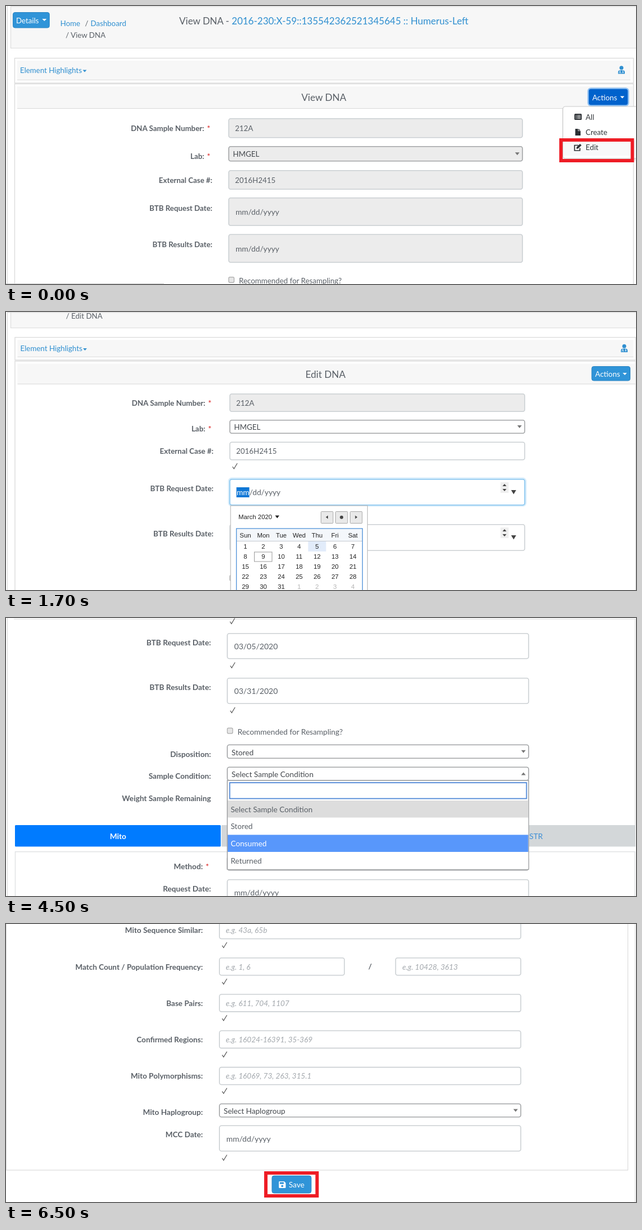
An HTML page that plays this animation: 1125x498 px, repeating every 8 s.

```html
<!DOCTYPE html>
<html lang="en">
<head>
<meta charset="utf-8">
<title>DNA form walkthrough</title>
<style>
html, body { margin: 0; width: 100%; height: 100%; overflow: hidden; background: #fff; }
svg { display: block; width: 1125px; height: 498px; font-family: Lato, "Open Sans", sans-serif; }
text { white-space: pre; }
.cal text { font-family: "Liberation Sans", Arial, sans-serif; }
</style>
</head>
<body>
<svg id="stage" viewBox="0 0 1125 498" xmlns="http://www.w3.org/2000/svg"></svg>
<script>
const INK = '#5a6067', DARK = '#45494e', LINK = '#2f8fd0', BLUE = '#3094d8',
      EDGE = '#cbd0d3', LINE = '#dcdcdc', PALE = '#f7f7f7', RED = '#ee1c25', LAB = 'HMGEL';
let size = 13.4;

// Boxes are given by their corners.
const box = (x1, y1, x2, y2, fill, stroke = 'none', w = 1.5, r = 0) =>
  `<rect x="${x1}" y="${y1}" width="${x2 - x1}" height="${y2 - y1}" rx="${r}" fill="${fill}" stroke="${stroke}" stroke-width="${w}"/>`;
const path = (d, fill, stroke = 'none', w = 1) =>
  `<path d="${d}" fill="${fill}" stroke="${stroke}" stroke-width="${w}"/>`;
const line = (x1, y1, x2, y2, c = LINE, w = 1.2) => path(`M${x1} ${y1}L${x2} ${y2}`, 'none', c, w);
const text = (s, x, y, fill = INK, o = {}) =>
  `<text x="${x}" y="${y}" fill="${fill}" font-size="${o.size || size}" font-weight="${o.bold ? 700 : 400}"` +
  ` font-style="${o.italic ? 'italic' : 'normal'}" text-anchor="${o.anchor || 'start'}">${s}</text>`;
const mid = (s, x, y, fill, o) => text(s, x, y, fill, { ...o, anchor: 'middle' });
const label = (s, x, y, star) => text(s, x, y, INK, { bold: 1, anchor: 'end' }) +
  (star ? text('*', x + 5, y, '#e0403f', { bold: 1 }) : '');
const tri = (x, y, w, h, fill) => path(`M${x - w / 2} ${y}h${w}l${-w / 2} ${h}z`, fill);
const tick = (x, y) => path(`M${x - 4} ${y + 1}l2.6 3.8L${x + 4.5} ${y - 5}`, 'none', '#555', 1.2);

const field = (x1, y1, x2, y2, s = '', base = 0, o = {}) =>
  box(x1 + .7, y1 + .7, x2 - .7, y2 - .7, o.fill || '#fff', o.edge || EDGE, 1.6, 3.5) +
  text(s, x1 + (o.pad || 12), base, o.ink || INK, o);
const date = (x1, y1, x2, y2, s, base, o = {}) =>
  field(x1, y1, x2, y2, s, base, { pad: 13, size: size * 1.025, ...o });
const select = (x1, y1, x2, y2, s, base, o = {}) => {
  const y = (y1 + y2) / 2;
  return field(x1, y1, x2, y2, s, base, { pad: 8.3, edge: '#a2a4a6', ink: DARK, ...o }) +
    (o.open ? tri(x2 - 10, y + 2.5, 8, -5, '#777') : tri(x2 - 10, y - 2.5, 8, 5, '#777'));
};
const checkbox = (x, y, s, base, fill = '#e6e6e6') =>
  box(x + .7, y + .7, x + 10.3, y + 10.3, fill, '#a9a9a9', 1.2, 2) + text(s, x + 19, base);
const button = (x1, y1, x2, y2, s, tx, base, fill = BLUE, edge = '#2a84c2') =>
  box(x1 + .5, y1 + .5, x2 - .5, y2 - .5, fill, edge, 1, 3.5) + text(s, tx, base, '#fff');
const user = (x, y) => `<g transform="translate(${x} ${y})">` +
  '<circle cy="-3.7" r="3.5" fill="' + LINK + '"/>' +
  path('M-6 7v-2.5q0-4 4-4h4q4 0 4 4V7z', LINK) +
  path('M-2.6 1v2.5m-1.4 2.5v-1.5q0-1 1.4-1t1.4 1V6M2.6 1v3', 'none', '#fff', .9) +
  '<circle cx="2.7" cy="4.6" r="1" fill="#fff"/></g>';

const highlights = (x1, y1, x2, y2, inner, base, icon) =>
  box(x1 + .5, y1 + .5, x2 - .5, y2, '#fff', LINE, 1.4) +
  box(x1 + 5, y1 + 5, inner, y2 - 6, PALE) + line(x1 + 5, y2 - 5.5, inner, y2 - 5.5) +
  text('Element Highlights', x1 + 10, base, LINK) +
  tri(x1 + 125.5, base - 5, 7, 4, LINK) + user(icon, base - 5);
const panel = (x1, y1, x2, bottom, s, cx, base) =>
  box(x1 + .5, y1 + .5, x2 - .5, 510, '#fff', LINE, 1.4) +
  box(x1 + 5, y1 + 5, x2 - 1, bottom, PALE) + line(x1 + 5, bottom, x2 - 1, bottom, '#d8d8d8') +
  mid(s, cx, base, INK, { size: 17.2 });
const dropdown = (x1, y1, x2, y2, rows, active, top, step, base) =>
  box(x1 + .7, y1, x2 - .7, y2, '#fff', '#a2a4a6', 1.6) +
  box(x1 + 5, y1 + 4, x2 - 4.5, y1 + 32.5, '#fff', '#4f87d6', 1.8) +
  rows.map((s, i) => {
    const y = top + i * step, fill = i == active ? '#5897fb' : i ? '#fff' : '#dddddd';
    return box(x1 + 1.5, y, x2 - 1.5, y + step, fill) +
      text(s, x1 + 6.7, base + i * step, i == active ? '#fff' : INK);
  }).join('');
const tabs = (x1, xm, x2, y1, y2, cx, base, str) =>
  box(xm + 1.5, y1, x2, y2, '#d3d7d9') + box(x1, y1, xm, y2, '#007bff', 'none', 0, 1.5) +
  mid('Mito', cx, base, '#fff', { bold: 1 }) + text('STR', str, base, '#3d8fd6');

function viewPage() {
  size = 13.37;
  const grey = { fill: '#ececec' }, x = 397, r = 923;
  return line(2.5, 0, 2.5, 498) + box(8, 1, 1130, 75, PALE) + path('M1125 .8H8.5V75.5H1125', 'none', LINE, 1.2) +
    button(12, 11, 78, 39.5, 'Details', 18, 30.5) + tri(68.5, 23, 8, 4, '#fff') +
    text('Home', 97, 35.5, LINK) + text('/', 141, 35.5) + text('Dashboard', 151, 35.5, LINK) +
    text('/ View DNA', 106.5, 57) +
    mid(`View DNA - <tspan fill="${LINK}">2016-230:X-59::135542362521345645 :: Humerus-Left</tspan>`, 567.5, 32.5, INK, { size: 17 }) +
    highlights(15, 93, 1121, 138, 1115, 119.5, 1099) +
    panel(15, 139, 1121, 183.5, 'View DNA', 567.5, 170) +
    box(1039.5, 147.5, 1111.5, 178.5, '#0062cc', '#8fc0f2', 2.4, 5) +
    text('Actions', 1047, 168.5, '#fff') + tri(1100.5, 161.5, 7.5, 4, '#fff') +
    label('DNA Sample Number:', 354, 224, 1) + field(x, 201, r, 236.5, '212A', 224, grey) +
    label('Lab:', 354, 273.5, 1) + select(x, 251, r, 278.5, LAB, 270, grey) +
    label('External Case #:', 368.5, 316.5) + field(x, 294, r, 329, '2016H2415', 317, grey) +
    label('BTB Request Date:', 368.5, 367) + date(x, 343, r, 394, 'mm/dd/yyyy', 374, grey) +
    label('BTB Results Date:', 368.5, 432) + date(x, 408.5, r, 460, 'mm/dd/yyyy', 440, grey) +
    checkbox(397, 485, 'Recommended for Resampling?', 497) +
    line(0, 497.5, 282, 497.5, '#cfcfcf') + actionMenu();
}

function actionMenu() {
  const ink = '#2b2f33';
  return box(993, 182, 1130, 277, '#000', 'none', 0, 4).replace('/>', ' opacity=".07"/>') +
    box(994.5, 180, 1130, 273, '#fff', '#c9c9c9', 1, 4) + box(995, 241, 1125, 268, '#f8f9fa') +
    box(1015, 193, 1028, 204, ink, 'none', 0, 1.5) +
    path('M1017 196h1.6m1.2 0h6.5m-9.3 2.6h1.6m1.2 0h6.5m-9.3 2.6h1.6m1.2 0h6.5', 'none', '#fff', 1.1) +
    path('M1016.5 220h5v4h4.5v8h-9.5zM1022.3 220l3.7 3.3h-3.7z', ink) +
    path('M1022 249.5h-6.7v9.5h9.5v-4.5', 'none', ink, 1.7) +
    path('M1018.5 255.8l.5-3 6-5.8 2.7 2.5-6.1 5.9z', ink) +
    ['All', 'Create', 'Edit'].map((s, i) => text(s, 1035, 203.5 + i * 27.3, '#33373b')).join('') +
    box(991, 240, 1118.5, 277, 'none', RED, 6);
}

const spinner = y => box(883, y - 10, 897.5, y + 9, '#efefef') +
  tri(890.2, y - 3, 7, -4, '#444') + tri(890.2, y + 2, 7, 4, '#444') + tri(906.5, y + 4, 9, 7.5, '#444');

function calendar() {
  const ink = '#222', f = { size: 11.4 };
  const col = i => 427.5 + i * 32, base = i => 423.5 + i * 18.2;
  let s = box(401, 347, 645.5, 510, '#fff', '#bdbdbd', 1.2) + text('March 2020', 415, 371, ink, f) + tri(484.3, 364.5, 7.5, 5, ink);
  for (const x of [562, 588, 614]) s += box(x + .5, 357.5, x + 22, 378.5, '#e9e9e9', '#a8a8a8', 1, 1);
  s += path('M575 364.5v6l-4-3zM623.5 364.5v6l4-3z', '#444') + '<circle cx="599.2" cy="367.7" r="3" fill="#444"/>';
  s += box(411, 388, 637, 410, '#f4f7fb') + line(411, 410.5, 637, 410.5, '#c4c9cf', 1) +
    path('M411.5 500V387.8H636.5V500', 'none', '#4a8fd8', 1.3) +
    box(539.5, 411, 571.5, 429, '#e2ecfa') + box(443.5, 430, 475, 447, '#fff', '#999', 1);
  'Sun Mon Tue Wed Thu Fri Sat'.split(' ').forEach((d, i) => s += mid(d, col(i), 403.5, ink, f));
  for (let i = 0; i < 35; i++)
    s += mid(i % 31 + 1, col(i % 7), base(Math.floor(i / 7)), i < 31 ? ink : '#b5b5b5', f);
  return `<g class="cal">${s}</g>`;
}

function editPage() {
  size = 13.42;
  const x = 399, r = 927;
  return line(2.5, 0, 2.5, 498) + box(8, 1, 1130, 28, PALE) + path('M1125 .7H2M8.5 1V28.5H1125', 'none', LINE, 1.2) +
    text('/ Edit DNA', 107, 11.5) +
    highlights(15.5, 45, 1125, 86, 1120.5, 70, 1104) +
    panel(15.5, 87.5, 1125, 129, 'Edit DNA', 570.5, 117.5) +
    button(1045.5, 97, 1115, 123.5, 'Actions', 1052, 116) + tri(1105, 109, 7.5, 4, '#fff') +
    label('DNA Sample Number:', 356, 168, 1) + field(x, 146, r, 179, '212A', 168, { fill: '#ececec' }) +
    label('Lab:', 356, 214, 1) + select(x, 193, r, 218, LAB, 211) +
    label('External Case #:', 370.5, 254) + field(x, 232.5, r, 265.5, '2016H2415', 254) + tick(408.5, 276) +
    label('BTB Request Date:', 370.5, 321) +
    box(x - 1, 298, r + 1, 347, 'none', '#d5ecfb', 3, 5) +
    date(x, 299, r, 346.5, '', 328, { edge: '#84c3ee' }) + box(411.5, 314, 434.5, 332, '#0f77d6') +
    text('<tspan fill="#fff">mm</tspan>/dd/yyyy', 412, 328, INK, { size: size * 1.025 }) + spinner(315) +
    label('BTB Results Date:', 370.5, 402) + date(x, 380, r, 428, '', 409) + spinner(396) +
    checkbox(399, 471, '', 482) + calendar();
}

function dispositionPage() {
  size = 13.47;
  const x = 399, r = 929, e = 371;
  return line(0, 1.5, 1125, 1.5) + line(2.5, 2, 2.5, 498) + line(15.5, 2, 15.5, 498) + line(1123.5, 2, 1123.5, 498) +
    label('Lab:', 356.5, 33.5, 1) + select(x, 12, r, 37.5, LAB, 30.5) +
    label('External Case #:', e, 73.5) + field(x, 52.5, r, 85, '2016H2415', 73.5, { pad: 13 }) + tick(409, 96) +
    label('BTB Request Date:', e, 140) + date(x, 118.5, r, 165.5, '03/05/2020', 146.8) + tick(409, 176) +
    label('BTB Results Date:', e, 221) + date(x, 199.5, r, 246.5, '03/31/2020', 228) + tick(409, 257.5) +
    checkbox(399, 290, 'Recommended for Resampling?', 301.5) +
    label('Disposition:', e, 342) + label('Sample Condition:', e, 382) + label('Weight Sample Remaining', e, 422) +
    tabs(28, 388.5, 1116, 466, 498, 208, 491, 928.5) +
    select(x, 320.5, r, 345.5, 'Select Disposition', 339, { open: 1 }) +
    dropdown(x, 345, r, 510, ['Select Disposition', 'Stored', 'Consumed', 'Returned'], 1, 381, 31.1, 402.5) +
    line(409.5, 356.5, 409.5, 372, '#222', 1);
}

function conditionPage() {
  size = 13.7;
  const x = 394.5, r = 934, e = 366;
  return line(14, 2, 1125, 2) + line(2.5, 0, 2.5, 498) + line(1123.5, 2, 1123.5, 371) + tick(404, 5.5) +
    label('BTB Request Date:', e, 49) + date(x, 27, r, 73.5, '03/05/2020', 55.7) + tick(404.5, 84.5) +
    label('BTB Results Date:', e, 128.5) + date(x, 107, r, 154, '03/31/2020', 136) + tick(404.5, 165) +
    checkbox(394.5, 196.5, 'Recommended for Resampling?', 209) +
    label('Disposition:', e, 248.5) + select(x, 226.5, r, 252, 'Stored', 245.5) +
    label('Sample Condition:', e, 288) + label('Weight Sample Remaining', e, 327.5) +
    tabs(16, 383.5, 1124, 371, 409.5, 200, 396, 934.5) +
    box(16.5, 418.7, 1123, 510, '#fff', '#dfe1e3', 1.4) +
    label('Method:', 351.5, 449.5, 1) + select(x, 427, r, 452.5, '', 446) +
    label('Request Date:', e, 489.5) + date(x, 468, r, 515, 'mm/dd/yyyy', 496.5) +
    select(x, 266.5, r, 291.5, 'Select Sample Condition', 284.7, { open: 1 }) +
    dropdown(x, 291, r, 450, ['Select Sample Condition', 'Stored', 'Consumed', 'Returned'], 2, 327, 30.7, 347.7);
}

function savePage() {
  size = 13.6;
  const x = 380.5, r = 920, e = 351.5, hint = { italic: 1, ink: '#a3a8ad' };
  const rows = [['Mito Sequence Similar', '43a, 65b'], ['Match Count / Population Frequency', '1, 6'],
    ['Base Pairs', '611, 704, 1107'], ['Confirmed Regions', '16024-16391, 35-369'], ['Mito Polymorphisms', '16069, 73, 263, 315.1']];
  return line(.5, 0, .5, 440) + line(1110.5, 0, 1110.5, 441) + line(0, 440.8, 1111, 440.8) + line(1123.5, 0, 1123.5, 498) +
    rows.map(([s, eg], i) => {
      const y = 16.2 + i * 65.3;
      return label(s + ':', e, y) + field(x, y - 21.5, i == 1 ? 605 : r, y + 11, 'e.g. ' + eg, y, hint) + tick(390, y + 21.5);
    }).join('') +
    text('/', 647, 81, INK, { bold: 1 }) + field(695, 60, r, 92.5, 'e.g. 10428, 3613', 81.5, { ...hint, pad: 12.7 }) +
    label('Mito Haplogroup:', e, 342) + select(x, 321.5, r, 346.5, 'Select Haplogroup', 339.5) +
    label('MCC Date:', e, 382) + date(x, 360.5, r, 407.5, 'mm/dd/yyyy', 389.5) + tick(390, 418.5) +
    box(464, 446, 555.5, 487, '#fff', RED, 6) +
    button(474.5, 450.5, 545.5, 482.5, 'Save', 505, 471.5) +
    path('M488.5 461h8.2l2.8 2.8v8q0 1.2-1.2 1.2h-9.8q-1.2 0-1.2-1.2v-9.6q0-1.2 1.2-1.2z', '#fff') +
    box(489, 462.5, 496, 465.7, BLUE) + `<circle cx="493.3" cy="469.3" r="1.9" fill="${BLUE}"/>`;
}

const LOOP = 8000;
const steps = [[0, viewPage], [500, editPage], [2500, dispositionPage], [4500, conditionPage], [6500, savePage]];
const stage = document.getElementById('stage');
stage.innerHTML = steps.map(([, draw], i) => `<g${i ? ' visibility="hidden"' : ''}>${draw()}</g>`).join('');
const scenes = [...stage.children], start = performance.now();
let shown = 0;

function frame() {
  const t = (performance.now() - start) % LOOP;
  const now = steps.filter(([from]) => from <= t).length - 1;
  if (now !== shown) {
    scenes[shown].setAttribute('visibility', 'hidden');
    scenes[now].setAttribute('visibility', 'visible');
    shown = now;
  }
  requestAnimationFrame(frame);
}
requestAnimationFrame(frame);
</script>
</body>
</html>
```
